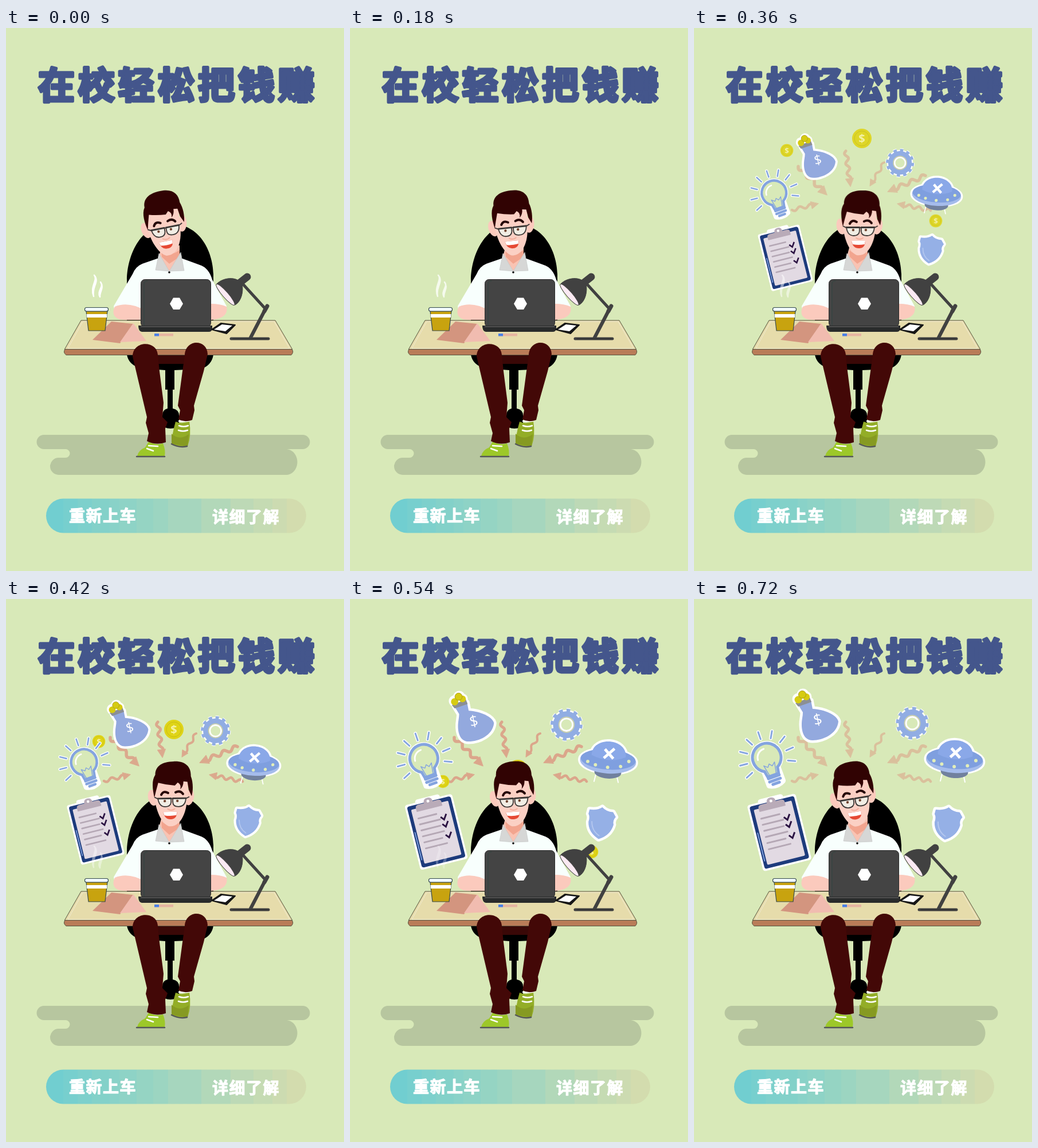
Write an HTML page that moves like this. It is 590x949 px and loops after 0.75 s.

```html
<!DOCTYPE html>
<html lang="zh">
<head>
<meta charset="utf-8">
<style>
  html, body { margin: 0; width: 100%; height: 100%; overflow: hidden; background: #d8e9b8; }
  svg { display: block; width: 590px; height: 949px; }
  text { font-family: "Noto Sans CJK SC", "Noto Sans CJK", sans-serif; font-weight: 900; }
  .money { font: 700 20px "Open Sans", sans-serif; text-anchor: middle; }
  .rim { fill: #fff; stroke: #fff; stroke-width: 9; stroke-linejoin: round; }
  .line { fill: none; stroke-linecap: round; stroke-linejoin: round; }
</style>
</head>
<body>
<svg viewBox="0 0 590 949">
  <defs>
    <linearGradient id="bands" gradientUnits="userSpaceOnUse" x1="70" x2="524"/>
    <g id="coin">
      <circle r="17" fill="#dfd417"/>
      <circle r="13" fill="none" stroke="#c9bd10"/>
      <text class="money" y="7" fill="#f6f2a4">$</text>
    </g>
    <path id="bagShape" d="M182 185L204 177 207 192C228 193 250 203 252 214C250 236 225 247 207 247C189 247 186 225 189 208Q190 202 190 198Z"/>
    <path id="shieldShape" d="M419 371Q433 371 441 364Q449 371 461 370L467 378Q462 385 465 392Q462 412 442 421Q422 412 420 393Q422 384 418 379Z"/>
    <g id="gearShape" fill="none">
      <circle r="18.5" stroke-width="11"/>
      <circle r="25.5" stroke-width="6" pathLength="24" stroke-dasharray="1"/>
    </g>
  </defs>

  <text x="56" y="123" font-size="64" letter-spacing="5.8" fill="#44568c" stroke="#44568c" stroke-width="5" stroke-linejoin="round">在校轻松把钱赚</text>
  <path fill="#b7c69f" d="M66 711H518a12.5 12.5 0 0 1 0 25H490a19.500 22.5 0 0 1-2 45H92a15 15 0 0 1 0-30H104a7.5 7.5 0 0 0 0-15H66a12.5 12.5 0 0 1 0-25Z"/>
  <rect x="70" y="822.5" width="454" height="60" rx="30" fill="url(#bands)"/>
  <g font-size="28" letter-spacing="1.5" fill="#fff" stroke="#fff" stroke-width="1.2" stroke-linejoin="round">
    <text x="110" y="863">重新上车</text>
    <text x="360" y="865">详细了解</text>
  </g>

  <g id="arrows" class="line" stroke="#dd8f7c"></g>
  <g id="coins">
    <use href="#coin" x="293"/>
    <use href="#coin" transform="translate(162 21) scale(.66)"/>
    <use href="#coin" transform="translate(422 144) scale(.66)"/>
  </g>

  <g id="icons">
    <g id="bag">
      <use href="#bagShape" class="rim"/>
      <g class="rim"><circle cx="182" cy="175" r="6"/><circle cx="190" cy="167" r="6"/><circle cx="196" cy="171" r="5"/></g>
      <use href="#bagShape" fill="#93a9de"/>
      <path d="M177 182L202 172 205 180 182 188Z" fill="#8b8f94"/>
      <g fill="#d6cb12"><circle cx="182" cy="176" r="6.500"/><circle cx="196" cy="171" r="6"/><circle cx="189" cy="167" r="6.5" stroke="#a89c20"/></g>
      <text class="money" x="216" y="220" style="font-size:27px;font-weight:400" fill="#fff" transform="rotate(-12 216 211)">$</text>
    </g>
    <g id="bulb">
      <g id="rays" class="line"></g>
      <g transform="rotate(-20 127 277)">
        <path class="rim" d="M114 300H140V325Q127 332 114 325Z"/>
        <circle cx="127" cy="277" r="29" fill="#fff"/>
        <path d="M115 299A25 25 0 1 1 139 299L137 310H117Z" fill="#d8e9b8" stroke="#84a4df" stroke-width="5"/>
        <path class="line" d="M111 276A16 16 0 0 1 127 261" stroke="#fff" stroke-width="3"/>
        <path class="line" d="M121 309L117 289 123 294 127 289 131 294 137 289 133 309" stroke="#84a4df" stroke-width="1.5"/>
        <path class="line" d="M117 313H137M117 319H137M121 325H133" stroke="#84a4df" stroke-width="5"/>
      </g>
    </g>
    <g id="gear">
      <use href="#gearShape" transform="translate(381 217) scale(1.04)" stroke="#fff"/>
      <circle cx="381" cy="217" r="18" fill="none" stroke="#fff" stroke-width="17"/>
      <use href="#gearShape" transform="translate(381 217)" stroke="#91ade3"/>
      <circle cx="381" cy="217" r="13.5" fill="none" stroke="#c9cfae" stroke-width="2"/>
    </g>
    <g id="ufo">
      <path class="line" d="M433 306L430 318M470 306L473 320" stroke="#fff" stroke-width="2"/>
      <g transform="rotate(4 455 281)">
        <g class="rim"><ellipse cx="455" cy="282" rx="49" ry="20"/><path d="M425 275C424 238 487 238 486 275Z"/></g>
        <ellipse cx="456" cy="302" rx="24" ry="11" fill="#71819e"/>
        <ellipse cx="455" cy="282" rx="50" ry="22" fill="#a5bcec"/>
        <ellipse cx="455" cy="279" rx="49" ry="18" fill="#7f9fdf"/>
        <path d="M425 273C424 238 487 238 486 273Q456 287 425 273Z" fill="#8aa8e8"/>
        <g fill="#e2eeb9"><circle cx="419" cy="285" r="3"/><circle cx="433" cy="290" r="3"/><circle cx="455" cy="293" r="3"/><circle cx="478" cy="290" r="3"/><circle cx="492" cy="280" r="3"/></g>
        <path d="M448 261L464 277M465 259L447 277" stroke="#fff" stroke-width="5"/>
      </g>
    </g>
    <g id="shield">
      <g transform="rotate(8 442 391)">
        <use href="#shieldShape" class="rim"/>
        <use href="#shieldShape" fill="#95b0e6"/>
        <path class="line" d="M426 392Q428 408 442 415" stroke="#b4c7ef" stroke-width="2"/>
      </g>
    </g>
    <g id="board">
      <g transform="translate(149 408) rotate(-14)">
        <path class="rim" d="M-39-55H39V55H-39ZM-19-60H17V-50H-19Z"/>
        <rect x="-40" y="-56" width="80" height="112" rx="4" fill="#1d3b7c"/>
        <rect x="-34" y="-49" width="68" height="99" rx="2" fill="#e2dae3"/>
        <path d="M-25-43V-50Q-25-55-18-55H-9Q-9-63-1-63T7-55H16Q22-55 22-50V-43Z" fill="#b9abb8"/>
        <circle cx="-1" cy="-57" r="2.5" fill="#fff"/>
        <path class="line" d="M-25-31H8M-25-20H12M-25-9H10M-25 2H14M-25 13H8M-25 24H14" stroke="#b5a8b5" stroke-width="3"/>
        <path d="M14-24L19-18 25-27M14-11L19-5 25-14M15 9L20 15 26 6" fill="none" stroke="#2b1242" stroke-width="3"/>
        <path class="line" d="M-37 -8V42" stroke="#7fa0dc" stroke-width="2"/>
      </g>
    </g>
  </g>

  <g id="chair">
    <path d="M211 512V440C212 395 236 342 287 342C338 342 361 390 362 430V512ZM211 571Q214 589 236 595L278 598V632H282V665Q273 667 273 677V692Q275 700 287 700T302 692V677Q302 667 291 665V632H294V598L340 596Q359 590 362 571Z"/>
    <path d="M264 571H316V587H264Z" fill="#3a0807"/>
  </g>

  <g id="desk" stroke="#57523f">
    <path d="M131 511H470L500 562H102Z" fill="#e6dcab"/>
    <path d="M134 513H468L495 560H108Z" fill="none" stroke="#f1ead0"/>
    <path d="M103 561.5H499Q503 566 498 571.5H105Q99 567 103 561.5Z" fill="#b97c58"/>
  </g>
  <path d="M151 545L184 513 222 517 199 551Z" fill="#d3957f"/>
  <path d="M222 516L245 547 199 549Z" fill="#f1bcb0"/>
  <path d="M259 534H292V538.5H259Z" fill="#e6b5a2"/>
  <path d="M259 534H267V538.5H259Z" fill="#4a80e6"/>
  <g stroke="#36494d" stroke-width="1.2">
    <path d="M140 495H177L173 529H144Z" fill="#c8a30f"/>
    <path d="M140.5 500H176.5L176 506H141Z" fill="#fff" stroke="none"/>
    <rect x="137.5" y="488.5" width="41" height="6.5" rx="3" fill="#f1fbff"/>
  </g>
  <path id="steam" d="M154 432C161 440 146 452 153 469C149 452 164 444 154 432ZM165 444C172 452 158 459 164 470C163 461 172 454 165 444Z" fill="#fff" stroke="#fff" stroke-width="2.5" stroke-linejoin="round"/>

  <g id="body">
    <path d="M264 403L238 412Q226 417 221 430L188 486Q190 505 208 507L227 508 236 488V500H358V505Q386 508 385 486L360 440Q354 419 338 414L308 403Z" fill="#f8fffd"/>
    <path d="M190 487Q206 480 226 486L236 490V510H207C186 510 185 496 190 487ZM358 482Q374 482 385 487C388 500 378 509 358 510Z" fill="#fbcabd"/>
    <path d="M272 380H303V402L285 425 266 403Z" fill="#f9c3b3"/>
    <path d="M271 388Q285 402 303 388V400L285 412 272 400Z" fill="#f2a58f"/>
    <path d="M267 394L261 423 285 425ZM305 392L311 424 285 425Z" fill="#d6d7d6" stroke="#c6c8c8" stroke-width=".7"/>
    <circle cx="285" cy="427" r="1.8"/>
  </g>

  <g id="head">
    <ellipse cx="257" cy="347" rx="8" ry="14" transform="rotate(-12 257 347)" fill="#fbcabd"/>
    <ellipse cx="321" cy="347" rx="8" ry="14" transform="rotate(12 321 347)" fill="#fbcabd"/>
    <path d="M260 312V345C262 370 272 392 284 397C297 399 306 389 311 377Q319 360 319 312Z" fill="#fbd0c4"/>
    <path d="M260 347C257 333 255 317 262 307C262 292 274 284 294 284C316 283 325 295 324 310C328 320 328 335 325 345L320 334 318 320 311 319Q311 328 305 333Q308 325 301 321L296 326Q281 325 267 321L263 335Z" fill="#310303"/>
    <path class="line" d="M272 342Q276 334 284 339M297 338Q305 334 310 341" stroke="#250404" stroke-width="4"/>
    <g stroke="#3a3735" stroke-width="1.8" fill="#f1ede4">
      <path d="M266 348H289V355Q288 363 279 363 268 363 266 348ZM292 348H315Q314 363 302 363 292 363 292 355Z"/>
      <path d="M260 346L266 349H315L321 346" fill="none"/>
    </g>
    <circle cx="278" cy="353" r="2.2" fill="#70432f"/><circle cx="300" cy="353" r="2.2" fill="#70432f"/>
    <path class="line" d="M283 367Q289 371 295 367" stroke="#f3ae9c" stroke-width="2"/>
    <path d="M275 372L299 372Q299 385 288 385T275 372Z" fill="#e64a35"/>
    <path d="M275 372H299L298 378Q287 380 277 378Z" fill="#fff"/>
  </g>

  <g id="laptop">
    <rect x="235.5" y="439.5" width="122" height="83" rx="7" fill="#444" stroke="#2b2b2b"/>
    <path class="line" d="M241 519V447Q241 442 247 442" stroke="#314440"/>
    <path d="M231 520H360V526Q359 531 354 531H237Q231 530 231 520Z" fill="#292b2b"/>
    <path d="M235 522H357" stroke="#515151" stroke-width="2"/>
    <path d="M286 482L292 471.5H303L309 482 303 492H292Z" fill="#fff"/>
  </g>
  <path d="M359 527L375 516 400 519 385 534Z" fill="#161616" stroke="#161616" stroke-width="2" stroke-linejoin="round"/>
  <path d="M363 527L377 518 395 520 383 530Z" fill="#fff"/>

  <g id="lamp" class="line" stroke="#414141">
    <path d="M413 447L453 491" stroke-width="5"/>
    <path d="M454 489L427 541" stroke-width="6"/>
    <path d="M456 486L451 495" stroke-width="7"/>
    <path d="M407 446L421 435" stroke-width="13"/>
    <path d="M368 447C379 436 402 433 412 447C415 460 411 478 400 484Z" style="fill:#414141"/>
    <ellipse cx="383" cy="466" rx="24" ry="5" transform="rotate(49 383 466)" stroke-width="1" style="fill:#fbe9f2"/>
    <path d="M393 543H458" stroke-width="5"/>
    <path d="M396 543H457" stroke="#2c2c2c" stroke-width="1"/>
  </g>

  <g id="legs">
    <g stroke="#55575a" stroke-width="2.5">
      <path d="M296 688Q308 693 320 687 324 712 317 731 302 734 289 727 290 708 296 688Z" fill="#93ad27" stroke="none"/>
      <path d="M289 709Q302 722 319 710L317 731 289 727Z" fill="#869a22" stroke="none"/>
      <path class="line" d="M289 727Q302 734 316 731"/>
      <path d="M229 748Q231 738 243 733L249 723Q263 730 274 726 279 738 277 748Z" fill="#9dc829" stroke="none"/>
      <path class="line" d="M228 749H277"/>
      <path class="line" d="M302 687H319M302 695Q310 698 318 695M301 703Q309 706 317 703M249 730L265 731M246 735L257 739" stroke="#fff"/>
    </g>
    <path d="M221 574C221 546 263 545 265 571L268 600 275 655 273 680 282 689 278 700 279 724Q262 730 246 722L249 708 244 690 246 680ZM312 572C313 543 351 543 352 570L345 600 328 660 329 668 325 685Q312 690 301 684L304 668 300 660 308 600Z" fill="#430807"/>
  </g>
</svg>
<script>
const $ = id => document.getElementById(id);
const lerp = (a, b, p) => a + (b - a) * p;

// Piecewise linear value from [time, value] pairs
function track(keys, t) {
  const i = keys.findIndex(k => k[0] > t);
  if (i < 0) return keys.at(-1)[1];
  if (!i) return keys[0][1];
  const [t0, v0] = keys[i - 1], [t1, v1] = keys[i];
  return lerp(v0, v1, (t - t0) / (t1 - t0));
}

function wavyArrow([x1, y1, x2, y2, width]) {
  const len = Math.hypot(x2 - x1, y2 - y1), ux = (x2 - x1) / len, uy = (y2 - y1) / len;
  const at = (s, n) => `${(x1 + ux * s - uy * n).toFixed(1)} ${(y1 + uy * s + ux * n).toFixed(1)}`;
  const points = [], stem = len - width * 2, waves = Math.round(len / 21);
  for (let s = 0; s <= stem; s++) points.push(at(s, width * .6 * Math.sin(s / stem * waves * 2 * Math.PI)));
  const back = len - width * 2.8, half = width * 1.4;
  return `<path d="M${points.join("L")}" stroke-width="${width}"/>
    <path d="M${at(len, 0)}L${at(back, half)}L${at(back, -half)}Z" style="fill:#dd8f7c" stroke-width="1"/>`;
}

$("arrows").innerHTML = [
  [182, 242, 232, 292, 5.5], [265, 215, 273, 277, 5], [332, 235, 307, 276, 4],
  [404, 258, 338, 286, 5.5], [413, 319, 355, 307, 4.5], [171, 318, 217, 307, 4.5]
].map(wavyArrow).join("");

let rays = "";
for (let i = 0; i < 9; i++) {
  const a = (5 - 28.5 * i) * Math.PI / 180, c = Math.cos(a), s = Math.sin(a);
  rays += `M${128 + 36 * c} ${279 + 36 * s}L${128 + 49 * c} ${279 + 49 * s}`;
}
$("rays").innerHTML = `<path d="${rays}" stroke="#fff" stroke-width="6"/><path d="${rays}" stroke="#86a6e0" stroke-width="3"/>`;

const edges = [70, 100, 125, 150, 181, 198, 228, 257, 283, 341, 392, 432, 465, 490, 524];
$("bands").innerHTML = edges.slice(1).map((x, i) => {
  const p = ((edges[i] + x) / 2 - 70) / 454;
  const color = [[109, 215], [206, 221], [209, 173]].map(([a, b]) => Math.round(lerp(a, b, p)));
  return [edges[i], x].map(e => `<stop offset="${(e - 70) / 454}" stop-color="rgb(${color})"/>`).join("");
}).join("");

// Centre at first sight, then at rest
const icons = {
  bag: [214, 230, 213.5, 203], bulb: [144.5, 292, 128.5, 278], gear: [353.5, 241, 381, 217],
  ufo: [414.5, 294, 455, 281], shield: [405, 385, 442, 391.5], board: [162.5, 400, 149, 408]
};
const tilt = [[0, -11], [180, -6.2], [300, -.5], [375, 0], [480, -1.8], [600, -5.9], [720, -9.4], [750, -11]];
const arrowFade = [[270, 0], [300, .16], [420, .7], [480, .85], [600, .62], [720, .45]];
const coinFade = [[300, .6], [360, .9], [420, 1], [570, 1], [600, .85], [660, 0]];

function draw(now) {
  const t = Math.floor(now % 750 / 30) * 30, shown = t >= 300;
  $("head").setAttribute("transform", `rotate(${track(tilt, t)} 287 415)`);
  $("steam").style.opacity = 1 - t / 720;
  $("arrows").style.opacity = track(arrowFade, t);
  $("coins").style.opacity = shown ? track(coinFade, t) : 0;
  $("coins").setAttribute("transform", `translate(0 ${158 + (t - 300) * .583})`);
  $("icons").style.opacity = shown ? 1 : 0;
  const p = Math.min(1, Math.max(0, (t - 300) / 270));
  for (const [id, [x0, y0, x1, y1]] of Object.entries(icons)) {
    $(id).setAttribute("transform", `translate(${lerp(x0, x1, p)} ${lerp(y0, y1, p)}) scale(${lerp(.82, 1, p)}) translate(${-x1} ${-y1})`);
  }
  requestAnimationFrame(draw);
}
requestAnimationFrame(draw);
</script>
</body>
</html>
```
